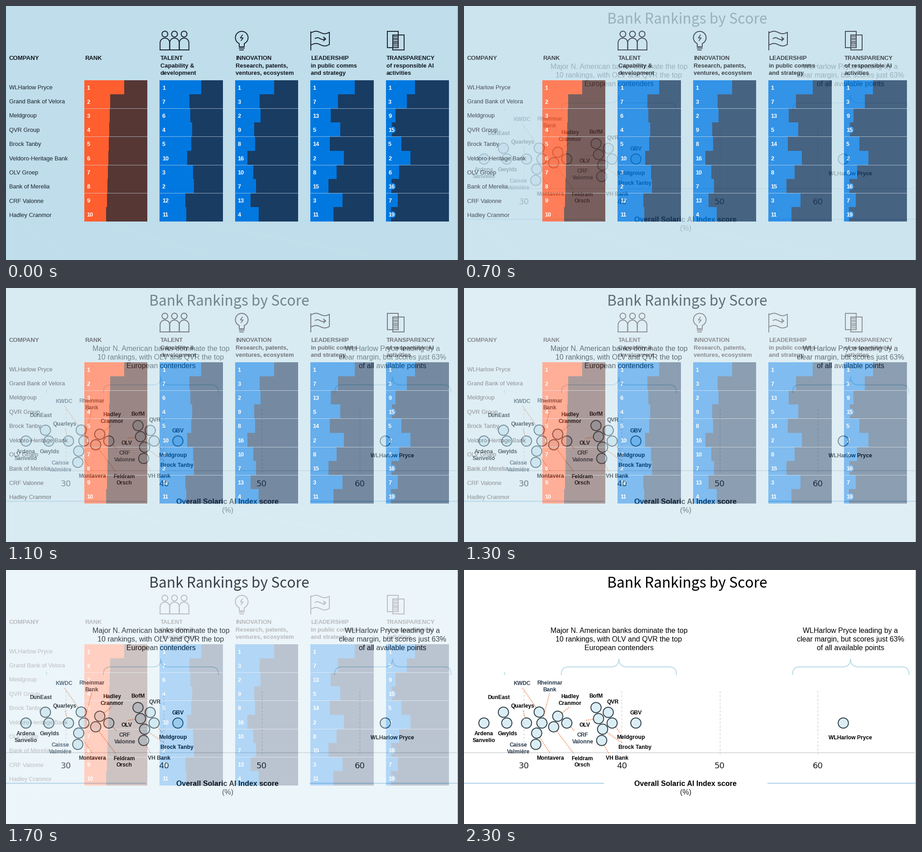
A matplotlib script that plays this animation: 998 px wide and 561 px high, repeating every 8 s.

```python
import numpy as np
import matplotlib.pyplot as plt
from matplotlib.animation import FuncAnimation
from matplotlib.patches import Arc, Circle, Ellipse, PathPatch, Rectangle
from matplotlib.path import Path

W, H, DPI = 998, 561, 64
PX = 72 / DPI

SKY, INK = "#bfddea", "#1c2430"
ORANGE, BROWN = "#ff5e2f", "#563734"
BLUE, NAVY = "#0078e0", "#193c63"
SLATE, PALE = "#2a3b4d", "#b9dae8"

fig = plt.figure(figsize=(W / DPI, H / DPI), dpi=DPI)


def stage(color):
    ax = fig.add_axes([0, 0, 1, 1])
    ax.set(xlim=(0, W), ylim=(H, 0))
    ax.axis("off")
    box(ax, 0, 0, W, H, color)
    line(ax, [(W - 0.5, 0), (W - 0.5, H)], "#8b9296", 1, zorder=9)
    return ax


def text(ax, x, y, s, size, color="black", bold=False, ha="left",
         font="Liberation Sans"):
    """Place text with its capitals centred on y."""
    ax.text(x, y + 0.36 * size, s, fontsize=size * PX, color=color, ha=ha,
            va="baseline", weight="bold" if bold else "normal", family=font)


def paragraph(ax, x, y, s, size, step, **kw):
    """Stack lines around the middle y."""
    lines = s.split("\n")
    for i, part in enumerate(lines):
        text(ax, x, y + (i - (len(lines) - 1) / 2) * step, part, size, **kw)


def line(ax, pts, color=INK, lw=2.0, **kw):
    x, y = zip(*pts)
    ax.plot(x, y, color=color, lw=lw * PX, solid_capstyle="butt", **kw)


def box(ax, x, y, w, h, color):
    ax.add_patch(Rectangle((x, y), w, h, fc=color, lw=0))


def ring(ax, x, y, r, lw=2.0, fill="none", edge=INK):
    ax.add_patch(Circle((x, y), r, fc=fill, ec=edge, lw=lw * PX))


# ---- table scene ----

COMPANIES = ["WLHarlow Pryce", "Grand Bank of Velora", "Meldgroup", "QVR Group",
             "Brock Tanby", "Veldoro-Heritage Bank", "OLV Groep",
             "Bank of Merelia", "CRF Valonne", "Hadley Cranmor"]


def steady(best, start, slope):
    """Bar length by rank: a clear leader, then an even decline."""
    return lambda r: best if r == 1 else start - slope * r


# heading, ranks by company, bar length by rank
COLUMNS = [
    ("RANK", "1 2 3 4 5 6 7 8 9 10", steady(88, 59.5, 1.1)),
    ("TALENT\nCapability &\ndevelopment",
     "1 7 6 4 5 10 3 2 12 11", steady(92, 79, 1.85)),
    ("INNOVATION\nResearch, patents,\nventures, ecosystem",
     "1 3 2 9 8 16 10 7 13 4", steady(86.5, 60.5, 2.05)),
    ("LEADERSHIP\nin public comms\nand strategy",
     "1 7 13 5 14 2 8 15 3 11", steady(98, 79, 2.6)),
    ("TRANSPARENCY\nof responsible AI\nactivities",
     "1 3 9 15 5 2 6 16 7 19", lambda r: 10 + 66 * np.exp(-r / 5)),
]
LEFT, TOP, ROW, COL_W, COL_STEP = 173, 163.5, 31.2, 139.5, 166.4


def people(ax):
    a = np.linspace(np.pi, 2 * np.pi, 30)
    for cx in (350.8, 372, 393.2):
        ring(ax, cx, 62, 6.4)
        arch = [(cx + 10.6 * np.cos(t), 81.5 + 10.6 * np.sin(t)) for t in a]
        line(ax, [(cx - 10.6, 97)] + arch + [(cx + 10.6, 97)])
    line(ax, [(339.2, 96.5), (404.8, 96.5)])


def bulb(ax):
    cx = 520.5
    ax.add_patch(Arc((cx, 70), 28, 28, theta1=112, theta2=428, ec=INK, lw=2 * PX))
    line(ax, [(cx - 5.2, 82.5), (cx - 5.2, 89.5), (cx + 5.2, 89.5), (cx + 5.2, 82.5)])
    for y, half in ((93.2, 6.5), (97, 5)):
        line(ax, [(cx - half, y), (cx + half, y)])
    line(ax, [(cx + 2, 63.5), (cx - 3, 70.5), (cx + 3, 70.5), (cx - 2, 77)], lw=1.8)


def flag(ax):
    u = np.linspace(0, 1, 40)
    x, wave = 674 + 40 * u, 59 - 3 * np.sin(2 * np.pi * u) - u
    line(ax, list(zip(x, wave)) + list(zip(x[::-1], wave[::-1] + 27)))
    line(ax, [(673.5, 55.5), (673.5, 97.5)])
    line(ax, list(zip(682 + 23 * u, 72 - 2 * np.sin(2 * np.pi * u))))
    line(ax, [(700.5, 68), (706, 72.8), (700.5, 77.5)])


def papers(ax):
    for x, y, w, h in ((841.7, 56, 24.3, 35.5), (854, 64, 25, 32.8)):
        ax.add_patch(Rectangle((x, y), w, h, fc="none", ec=INK, lw=2 * PX))
    for y in np.arange(67.3, 91, 3.4):
        line(ax, [(854, y), (866, y)], lw=1.7)


def table():
    ax = stage(SKY)
    for x0, x1 in ((13, 13), (42, 132), (215, 480), (420, 850)):
        line(ax, [(x0, 478), (x1, H)], "#c6e1ed", 1.5)
    for icon in (people, bulb, flag, papers):
        icon(ax)
    text(ax, 7, 114.5, "COMPANY", 13.2, "#111820", True)
    for i, name in enumerate(COMPANIES):
        text(ax, 7, 179 + 31.4 * i, name, 12.9, "#18222c")

    for c, (head, ranks, length) in enumerate(COLUMNS):
        x = LEFT + COL_STEP * c
        for i, s in enumerate(head.split("\n")):
            text(ax, x + 1.2, 114.5 + 16.4 * i, s, 13, "#111820", True)
        bar, back = (BLUE, NAVY) if c else (ORANGE, BROWN)
        box(ax, x, TOP, COL_W, 10 * ROW, back)
        for i, rank in enumerate(map(int, ranks.split())):
            y, w = TOP + i * ROW, length(rank)
            box(ax, x, y, w, ROW, bar)
            if w < 20:
                ax.add_patch(Ellipse((x + 15, y + 16.5), 14, 15, fc=bar, lw=0))
            if i and i % 2 == 0:
                line(ax, [(x, y), (x + COL_W, y)], "#d5e6ef", 1, alpha=0.65)
            text(ax, x + 5.5, y + 16.5, str(rank), 12.8, "white", True)
    return ax


# ---- score scene ----

MID, GAP = 338, 25

# name, x of the dot, label offset from the dot, leader line
BANKS = [
    ("Ardena\nSanvelio", 44, 0, 30, ""), ("Gwylds", 94.5, 2, 23, ""),
    ("Quarleys", 138, -8, -38, ":"), ("Rheinmar\nBank", 172, 17, -82, ":"),
    ("CRF\nValonne", 227, 35, 33, ":"), ("Meldgroup", 327, 42, 31, ":"),
    ("GBV", 379.5, 0, -23, ""), ("WLHarlow Pryce", 837.5, 15, 32, ""),
    ("DunEast", 87, -10, -34, ""), ("KWDC", 166, -38, -64, ":"),
    ("Montavera", 160.5, 30, 54, ":"), ("Caisse\nValmière", 158.5, -38, 8, ""),
    ("Hadley\nCranmor", 207, 27, -37, ":"), ("Feldram\nOrsch", 198, 63, 76, ":"),
    ("QVR", 318.5, 10, -24, ""), ("Brock Tanby", 306, 71, 39, ":"),
    ("VH Bank", 304, 34, 38, ":"), ("OLV", 297, -30, 13, ":"),
    ("BofM", 291.5, 0, -26, ""),
]
MUTED = ("KWDC", "Rheinmar", "CRF", "Caisse")


def swarm(xs):
    """Keep every dot as near the middle line as its neighbours allow."""
    dots = []
    for x in xs:
        near = [(px, py) for px, py in dots if abs(px - x) < GAP]
        tries = [0] + [py + side * np.sqrt(GAP**2 - (px - x)**2)
                       for px, py in near for side in (-1, 1)]
        free = [y for y in tries
                if all(np.hypot(px - x, py - y) > GAP - 0.01 for px, py in near)]
        dots.append((x, min(free, key=abs)))
    return [(x, MID + y) for x, y in dots]


def leader(ax, x, y, lx, ly, name):
    """Dotted line from a dot's rim to the facing side of its label."""
    lines = name.split("\n")
    if lx - x > 32:
        lx -= 2.6 * max(map(len, lines))
    ly -= np.sign(ly - y) * (2 + 7 * len(lines))
    t = 13 / np.hypot(lx - x, ly - y)
    line(ax, [(x + t * (lx - x), y + t * (ly - y)), (lx, ly)],
         "#ee6a28", 1.8, dashes=(1, 1.3))


def brace(ax, x0, mid, x1):
    codes = [Path.MOVETO] + [Path.CURVE4] * 3 + [Path.LINETO] + [Path.CURVE4] * 3
    for x, s in ((x0, 1), (x1, -1)):
        pts = [(x, 232), (x, 220), (x + 4 * s, 214), (x + 16 * s, 214),
               (mid - 18 * s, 214), (mid - 6 * s, 214), (mid, 208), (mid, 196)]
        ax.add_patch(PathPatch(Path(pts, codes), fc="none", ec=PALE, lw=2 * PX))


def scores():
    ax = stage("white")
    text(ax, 493, 27.5, "Bank Rankings by Score", 31.8, ha="center",
         font="Noto Sans CJK JP")
    paragraph(ax, 342, 152.3, "Major N. American banks dominate the top\n"
              "10 rankings, with OLV and QVR the top\n"
              "European contenders", 16, 19.4, ha="center")
    paragraph(ax, 853.5, 152.3, "WLHarlow Pryce leading by a\n"
              "clear margin, but scores just 63%\n"
              "of all available points", 16, 19.4, ha="center")
    brace(ax, 215, 342, 469)
    brace(ax, 725.5, 853.5, 982.5)
    line(ax, [(88.5, 225), (90.5, 232)], PALE, 1.6)

    for score in range(30, 70, 10):
        x = 132 + 21.63 * (score - 30)
        line(ax, [(x, 267), (x, 410)], "#cfcfcf", 1.3, dashes=(3.5, 3))
        text(ax, x, 431.5, str(score), 18.2, "#1c1c1c", ha="center",
             font="DejaVu Sans")
    line(ax, [(0, 403.2), (995, 403.2)], "#c8cbcd", 1.4)
    for x0, x1 in ((0, 309), (670, 997)):
        line(ax, [(x0, 471), (x1, 471)], "#b2d2e8", 2.2)

    for (x, y), (name, _, dx, dy, dots) in zip(swarm([b[1] for b in BANKS]), BANKS):
        if dots:
            leader(ax, x, y, x + dx, y + dy, name)
        ring(ax, x, y, 11.3, 2, "#dceef5", "#2f4048")
        color = SLATE if name.startswith(MUTED) else "black"
        paragraph(ax, x + dx, y + dy, name, 12.1, 14.3, color=color,
                  bold=True, ha="center")
    text(ax, 489.3, 471, "Overall Solaric AI Index score", 16, bold=True, ha="center")
    text(ax, 489.3, 490.5, "(%)", 16, "#222222", ha="center")
    return ax


def render(scene):
    ax = scene()
    fig.canvas.draw()
    pixels = np.asarray(fig.canvas.buffer_rgba())[..., :3].astype(float)
    ax.remove()
    return pixels


before, after = render(table), render(scores)

view = fig.add_axes([0, 0, 1, 1])
view.axis("off")
picture = view.imshow(before.astype(np.uint8), extent=(0, W, H, 0),
                      aspect="auto", interpolation="nearest")


def update(n):
    # dissolve in ten steps of 200 ms, starting at 500 ms
    mix = np.clip((n - 5) // 2 + 1, 0, 10) / 10
    picture.set_data(np.rint(before + (after - before) * mix).astype(np.uint8))
    return [picture]


anim = FuncAnimation(fig, update, frames=80, interval=100, repeat=True,
                     repeat_delay=0, blit=False)
plt.show()
```
